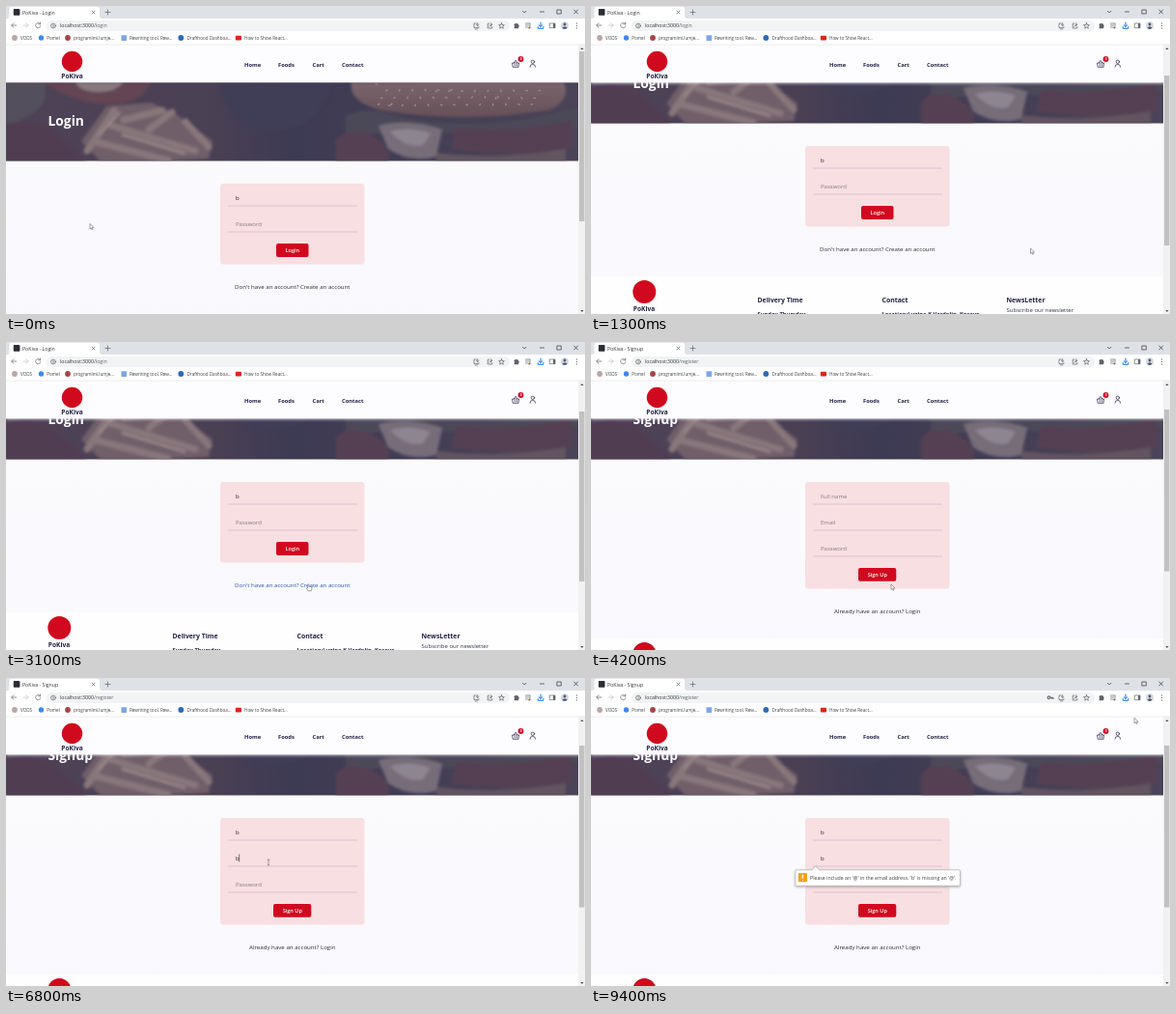
Recreate the animation shown at these times as an HTML page. Size 600 px wide and 319 px high, loop 9500 ms.

```html
<!DOCTYPE html>
<html lang="en">
<head>
<meta charset="utf-8">
<title>Signup walkthrough</title>
<style>
  html, body { margin: 0; width: 100%; height: 100%; overflow: hidden; background: #fff; }
  svg { display: block; width: 100vw; height: 100vh; }
  text { font-family: "Open Sans", "Noto Sans", sans-serif; white-space: pre; }
  .ui { font-size: 5.2px; fill: #303236; }
  .mark { font-size: 4.6px; fill: #3c4043; }
  .nav { font-size: 5.8px; font-weight: 700; fill: #212245; }
  .brand { font-size: 6.6px; font-weight: 700; fill: #212245; }
  .title { font-size: 13.8px; font-weight: 700; fill: #fff; }
  .hint { font-size: 6px; fill: #85797f; }
  .value { font-size: 6px; fill: #222; }
  .link { font-size: 6.13px; fill: #2b2d38; text-anchor: middle; }
  .link.hover { fill: #2456ae; }
  .button { font-size: 5.55px; font-weight: 600; fill: #fff; text-anchor: middle; }
  .head { font-size: 6.9px; font-weight: 700; fill: #212245; }
  .small { font-size: 6px; fill: #33364a; }
  .rule { fill: none; stroke: #cdb9ce; stroke-width: .7; }
  .icon { fill: none; stroke: #5f6368; stroke-width: .7; stroke-linecap: round; stroke-linejoin: round; }
  .off { display: none; }
</style>
</head>
<body>
<svg viewBox="0 0 600 319" preserveAspectRatio="none">
  <defs>
    <clipPath id="view"><rect y="40" width="593" height="279"/></clipPath>
    <clipPath id="heroBox"><rect y="79" width="593" height="81.5"/></clipPath>
    <filter id="soft" x="-10%" y="-10%" width="120%" height="120%"><feGaussianBlur stdDeviation="1.6"/></filter>
    <filter id="shade" x="-10%" y="-30%" width="120%" height="180%"><feDropShadow dx="0" dy="1" stdDeviation="1.3" flood-color="#333" flood-opacity=".4"/></filter>
    <filter id="glow" x="-2%" y="-10%" width="104%" height="130%"><feDropShadow dx="0" dy="1" stdDeviation="1.4" flood-color="#e4e2ea" flood-opacity=".8"/></filter>
    <linearGradient id="dusk">
      <stop offset="0" stop-color="#4e4257"/><stop offset=".36" stop-color="#4a4054"/>
      <stop offset=".5" stop-color="#3d3a53"/><stop offset="1" stop-color="#4b4357"/>
    </linearGradient>
    <linearGradient id="bun" x2="0" y2="1">
      <stop offset="0" stop-color="#7a656c"/><stop offset="1" stop-color="#665058"/>
    </linearGradient>
    <linearGradient id="paper" x2="0" y2="1">
      <stop offset="0" stop-color="#fcfbfd"/><stop offset="1" stop-color="#f9f8fc"/>
    </linearGradient>
  </defs>

  <rect width="600" height="319" fill="url(#paper)"/>

  <g clip-path="url(#view)">
    <g id="page">
      <g clip-path="url(#heroBox)">
        <rect y="79" width="594" height="82" fill="url(#dusk)"/>
        <g filter="url(#soft)">
          <path d="M0 79H40Q46 100 26 112T0 122Z" fill="#524f5c"/>
          <path d="M38 79H150Q140 101 108 102T38 79Z" fill="#634552"/>
          <path d="M72 79H122Q112 90 94 89T72 79Z" fill="#88797f"/>
          <path d="M0 122Q36 114 58 136T84 161H0Z" fill="#513c51"/>
          <path d="M78 140L104 104 150 100 176 112 214 140 210 158 150 161H98Z" fill="#6f5f69"/>
          <g stroke="#88767a" stroke-width="7" stroke-linecap="round">
            <path d="M84 150L112 108M110 124L196 150M122 118L162 108M148 128L172 110M186 120L210 146M90 140L168 160"/>
          </g>
          <path d="M96 134L118 110M120 133L186 153" stroke="#9b888a" stroke-width="2.5"/>
          <path d="M222 79H338Q326 126 278 130T222 79Z" fill="#413d57"/>
          <path d="M358 79H578Q586 98 562 108Q470 122 388 108Q354 98 358 79Z" fill="url(#bun)"/>
          <path d="M352 114Q372 104 398 112T470 122T594 106V126Q530 136 470 132T352 136Z" fill="#4b4a58"/>
          <path d="M386 124Q416 116 452 128L446 156Q418 163 396 148Z" fill="#766d79"/>
          <path d="M398 130Q418 124 440 132L432 144Q414 148 398 130Z" fill="#8d858f"/>
          <path d="M466 126Q530 132 586 118V148Q530 158 462 148Z" fill="#544152"/>
          <path d="M342 138Q356 124 378 134T396 161H342Z" fill="#543f53"/>
          <path d="M446 152Q510 160 580 148V161H446Z" fill="#625560"/>
        </g>
        <g id="seeds" fill="#9a878a"></g>
      </g>
      <text id="title" class="title" x="43.5" y="124">Login</text>

      <g id="login">
        <rect x="222" y="184" width="149.5" height="83.5" rx="3" fill="#f8dfe1"/>
        <path class="rule" d="M230 207H364M230 234H364"/>
        <text class="value" x="238" y="201">b</text>
        <text class="hint" x="238" y="228">Password</text>
        <rect x="280" y="246" width="33.5" height="14" rx="2" fill="#d1091f"/>
        <text class="button" x="296.8" y="255">Login</text>
        <text class="link" x="296.8" y="293">Don't have an account? Create an account</text>
      </g>

      <g id="signup">
        <rect x="222" y="184" width="149.5" height="110.5" rx="3" fill="#f8dfe1"/>
        <path class="rule" d="M230 207H364M230 234H364M230 261H364"/>
        <text id="name" x="238" y="201"></text>
        <text id="email" x="238" y="228"></text>
        <text id="pass" x="238" y="255"></text>
        <path id="caret" d="M241.7 0V8" stroke="#222" stroke-width=".6"/>
        <rect x="277" y="273" width="39.3" height="13.7" rx="2" fill="#d1091f"/>
        <text class="button" x="296.8" y="281.7">Sign Up</text>
        <text class="link" x="296.8" y="319.6">Already have an account? Login</text>
      </g>

      <g id="footer">
        <rect y="319" width="594" height="60" fill="#fefefe"/>
        <circle cx="55.3" cy="335" r="12" fill="#d1091f"/>
        <text class="brand" x="55" y="355" text-anchor="middle">PoKiva</text>
        <text class="head" x="172.5" y="345.6">Delivery Time</text>
        <text class="head" x="301.5" y="345.6">Contact</text>
        <text class="head" x="430.5" y="345.6">NewsLetter</text>
        <text class="nav" x="172.5" y="359.5">Sunday-Thursday</text>
        <text class="nav" x="301.5" y="359.5">Location:Lugina K Vardolin, Kosovo</text>
        <text class="small" x="430.5" y="356.3">Subscribe our newsletter</text>
      </g>
    </g>

    <rect id="header" y="36" width="594" height="43.3" fill="#fdfcfe"/>
    <circle cx="68.5" cy="57.5" r="10.7" fill="#d1091f"/>
    <text class="brand" x="68.5" y="75.2" text-anchor="middle">PoKiva</text>
    <text class="nav" x="247" y="63">Home</text>
    <text class="nav" x="282" y="63">Foods</text>
    <text class="nav" x="317.5" y="63">Cart</text>
    <text class="nav" x="348" y="63">Contact</text>
    <g class="icon" style="stroke:#212245">
      <path d="M525 59H531.6L531 63.3H525.6ZM526.3 59L528 56.3 530 59M527.3 60.5V62M529.4 60.5V62"/>
      <circle cx="545.8" cy="57.8" r="1.7"/><path d="M543 63.2Q543 60.3 545.8 60.3T548.6 63.2"/>
    </g>
    <circle cx="533.5" cy="55" r="2.9" fill="#d1091f"/>
    <text x="533.5" y="56.4" font-size="3.8" font-weight="700" fill="#fff" text-anchor="middle">3</text>
  </g>

  <!-- scrollbar -->
  <rect x="593" y="40" width="7" height="279" fill="#f1f1f1"/>
  <rect id="thumb" x="594" width="5.4" fill="#c1c1c1"/>
  <path d="M595.2 45L596.9 43 598.6 45ZM595.2 315L596.9 317 598.6 315Z" fill="#555"/>

  <!-- browser frame -->
  <rect width="600" height="13" fill="#dee1e6"/>
  <rect y="13" width="600" height="27" fill="#fff"/>
  <path d="M0 40H600" stroke="#e0e2e5" stroke-width=".6"/>
  <path d="M1 13Q3.5 13 3.5 10V3Q3.5 .8 6 .8H94.5Q97 .8 97 3V10Q97 13 99.5 13Z" fill="#fff"/>
  <rect x="7.8" y="3" width="6.6" height="6.8" rx=".8" fill="#282c34"/>
  <text id="tab" class="ui" x="17" y="8.5"></text>
  <path class="icon" d="M89 5L92 8M92 5L89 8M105.5 4V9M103 6.5H108"/>
  <path class="icon" style="stroke:#333" d="M535.5 5.3L537.2 7 538.9 5.3M553.5 6H557.5M571.3 4H575.3V8H571.3ZM588.7 4L592.5 8M592.5 4L588.7 8"/>

  <path class="icon" d="M10.8 20H5.8M8 17.7L5.7 20 8 22.3M35.4 18.6A2.6 2.6 0 1 0 35.8 20.7M35.7 16.9V18.8H33.7"/>
  <path class="icon" style="stroke:#bdc1c6" d="M18 20H23M20.8 17.7L23.1 20 20.8 22.3"/>
  <rect x="42" y="15" width="480" height="11" rx="5.5" fill="#f1f3f4"/>
  <g class="icon">
    <circle cx="49" cy="20.5" r="2.4"/><path d="M49 20.3V21.7M49 19.2V19.3"/>
    <path d="M490 21.7V22.5H485V18H487.4M488.7 17.5V20.5M487.4 19.3L488.7 20.5 490 19.3M486.3 24H488.8"/>
    <path d="M501 18.2H499.2V23H503.8V21.5M500.7 21.2Q501 19.2 503.5 19.2M502.3 17.6L504 19.2 502.3 20.8"/>
    <path d="M513.5 17.5L514.3 19.5 516.4 19.7 514.8 21.1 515.3 23.2 513.5 22.1 511.7 23.2 512.2 21.1 510.6 19.7 512.7 19.5Z"/>
    <path d="M538.5 18H543M538.5 20H541.5M538.5 22H540.5M543 18.4V22.3"/>
    <path d="M563.7 18H569V22.7H563.7Z"/>
  </g>
  <path d="M526.5 18.5H528Q528.7 16.3 529.6 18.5H531.2V20Q533 20.8 531.2 21.5V23.2H526.5V21.7Q528 20.8 526.5 20Z" fill="#5f6368"/>
  <path d="M567 18H569V22.7H567Z" fill="#5f6368"/>
  <circle cx="542.3" cy="22.5" r="1" fill="#5f6368"/>
  <path class="icon" style="stroke:#1a73e8;stroke-width:1" d="M554 17V21.2M552.2 19.7L554 21.4 555.8 19.7M551.2 21.5V23.3H556.8V21.5"/>
  <circle cx="579" cy="20.3" r="4" fill="#d5dae2"/>
  <path d="M576.3 22.8Q579 19.5 581.7 22.8Q579 25 576.3 22.8Z" fill="#4b5668"/><circle cx="579" cy="19" r="1.4" fill="#4b5668"/>
  <path d="M591.5 17.8V18M591.5 20.3V20.5M591.5 22.8V23" class="icon" style="stroke-width:1.1"/>
  <g id="key" class="icon"><circle cx="474.5" cy="20.3" r="1.4" stroke-width="1.1"/><path d="M476 20.3H479V21.6M477.7 20.3V21.4" stroke-width="1"/></g>
  <text class="ui" x="56" y="22.3">localhost:3000<tspan id="path" fill="#5f6368"></tspan></text>

  <circle cx="9" cy="33" r="2.9" fill="#b9a6a4"/><text class="mark" x="15" y="34.8">VODS</text>
  <circle cx="36.5" cy="33" r="2.7" fill="#4285f4"/><text class="mark" x="42.3" y="34.8">Pomel</text>
  <circle cx="64" cy="33" r="2.9" fill="#a6454a"/><text class="mark" x="70" y="34.8">programimi.lumje...</text>
  <rect x="119.5" y="30.2" width="5.6" height="5.8" rx=".6" fill="#7fa5e6"/><text class="mark" x="128" y="34.8">Rewriting tool, Rew...</text>
  <circle cx="181.3" cy="33" r="2.9" fill="#2b6cb5"/><text class="mark" x="187.5" y="34.8">Drafthood Dashboa...</text>
  <rect x="237.8" y="30.7" width="6.2" height="4.8" rx="1" fill="#e3211c"/><text class="mark" x="247" y="34.8">How to Show React...</text>

  <g id="bubble">
    <path filter="url(#shade)" d="M213 198.8H229L232.8 195.2 236.6 198.8H381.3Q382.5 198.8 382.5 200V214Q382.5 215.2 381.3 215.2H213Q211.8 215.2 211.8 214V200Q211.8 198.8 213 198.8Z" fill="#fff" stroke="#a5a5a8" stroke-width=".6"/>
    <rect x="214.8" y="202" width="9.2" height="9.2" rx="1" fill="#f5a21d"/>
    <path d="M219.4 203.8V207.5M219.4 209V209.7" stroke="#fff" stroke-width="1.2"/>
    <text x="227" y="208.9" font-size="5.23" fill="#3f4045">Please include an '@' in the email address. 'b' is missing an '@'.</text>
  </g>

  <g id="cursor" stroke="#4a4a4a" stroke-width=".5" stroke-linejoin="round">
    <path id="arrow" fill="#fff" d="M0 0V5.4L1.3 4.3 2.2 6.3 3.1 5.9 2.2 4H4Z"/>
    <path id="hand" fill="#fff" d="M-.6 4V.6Q0 -.2 .6 .6V2.8L3.4 3.4Q3.8 6 2.6 7.4H-.4L-2 4.6Q-1.8 3.6 -.6 4Z"/>
    <path id="beam" fill="none" d="M-1.2 -2.8H1.2M0 -2.8V2.8M-1.2 2.8H1.2"/>
  </g>
</svg>
<script>
  const LOOP = 9500, STEP = 100, SCROLL = 39;
  const NAVIGATE = 3600, SUBMIT = 7600;
  const $ = id => document.getElementById(id);
  const show = (id, on) => $(id).classList.toggle('off', !on);
  const ease = p => p * p * (3 - 2 * p);

  // time, x, y of the pointer's hot spot
  const route = [
    [0, 87, 225.5], [900, 440, 258], [1300, 455.5, 251], [2000, 455.5, 251],
    [2800, 313.5, 250.5], [3700, 313.5, 250.5], [4200, 311, 251], [4900, 311, 251],
    [5700, 273, 184.5], [6000, 272, 161], [6300, 272, 161], [6500, 272, 187],
    [6750, 272, 187], [6950, 272, 212], [7150, 272, 212], [7400, 292, 240],
    [7550, 292, 240], [7700, 287.5, 229.5], [8400, 287.5, 229.5], [9400, 563, 41.3]
  ];
  const fields = [
    { id: 'name', hint: 'Full name', value: 'b', focus: 6000, typed: 6300, line: 207 },
    { id: 'email', hint: 'Email', value: 'b', focus: 6500, typed: 6700, line: 234 },
    { id: 'pass', hint: 'Password', value: '•', focus: 6950, typed: 7100, line: 261 }
  ];

  // sesame seeds scattered evenly over the bun
  function sowSeeds() {
    let seeds = '';
    for (let i = 0; i < 44; i++) {
      const x = 384 + i * 61.8 % 172, y = 81 + i * 7.3 % 22;
      seeds += `<ellipse cx="${x}" cy="${y}" rx="1.5" ry=".8" transform="rotate(${i * 50} ${x} ${y})"/>`;
    }
    $('seeds').innerHTML = seeds;
  }

  function pointerAt(t) {
    const i = route.findIndex(stop => stop[0] > t);
    if (i < 0) return route[route.length - 1].slice(1);
    const [t0, x0, y0] = route[i - 1], [t1, x1, y1] = route[i];
    const p = ease((t - t0) / (t1 - t0));
    return [x0 + (x1 - x0) * p, y0 + (y1 - y0) * p];
  }

  function drawFields(t) {
    for (const f of fields) {
      const filled = t >= f.typed, el = $(f.id);
      el.textContent = filled ? f.value : f.hint;
      el.setAttribute('class', filled ? 'value' : 'hint');
    }
    const focused = t >= SUBMIT ? fields[1] : fields.filter(f => t >= f.focus).pop();
    const since = focused ? t - (t >= SUBMIT ? SUBMIT : focused.focus) : 0;
    show('caret', focused && since % 1000 < 500);
    if (focused) {
      const dx = t >= focused.typed ? 0 : -3.7;
      $('caret').setAttribute('transform', `translate(${dx} ${focused.line - 12.5})`);
    }
  }

  function drawPointer(t, signup, scroll) {
    const [x, y] = pointerAt(t), py = y + scroll;
    const inside = (x0, x1, y0, y1) => x > x0 && x < x1 && py > y0 && py < y1;
    const onLink = signup ? inside(252, 342, 314, 322) : inside(237, 357, 287, 296);
    const onButton = signup ? inside(277, 316, 273, 287) : inside(280, 313, 246, 260);
    const lines = signup ? [207, 234, 261] : [207, 234];
    const onField = lines.some(line => inside(230, 364, line - 17, line));
    const covered = t > SUBMIT && inside(212, 382, 238, 254);
    const shape = onLink || onButton ? 'hand' : onField && !covered ? 'beam' : 'arrow';
    for (const id of ['arrow', 'hand', 'beam']) show(id, id === shape);
    $('cursor').setAttribute('transform', `translate(${x} ${y})`);
    document.querySelectorAll('.link').forEach(link => link.classList.toggle('hover', onLink));
  }

  function draw(t) {
    const signup = t >= NAVIGATE;
    const p = ease(Math.min(1, Math.max(0, (t - 1000) / 300)));
    const scroll = SCROLL * p;
    const label = signup ? 'Signup' : 'Login';

    $('page').setAttribute('transform', `translate(0 ${-scroll})`);
    $('footer').setAttribute('transform', `translate(0 ${signup ? 27 : 0})`);
    $('header').setAttribute('filter', scroll > 0 ? 'url(#glow)' : 'none');
    $('thumb').setAttribute('y', signup ? 70 : 47 + 25 * p);
    $('thumb').setAttribute('height', signup ? 167.5 : 176);
    $('title').textContent = label;
    $('tab').textContent = 'PoKiva - ' + label;
    $('path').textContent = signup ? '/register' : '/login';
    show('login', !signup);
    show('signup', signup);
    show('key', t >= fields[2].typed);
    drawFields(t);

    const arriving = t < SUBMIT + 200;
    show('bubble', t > SUBMIT);
    $('bubble').setAttribute('opacity', arriving ? .85 : 1);
    $('bubble').setAttribute('transform', `translate(212 199) scale(${arriving ? .982 : 1}) translate(-212 -199)`);
    drawPointer(t, signup, scroll);
  }

  sowSeeds();
  const start = performance.now();
  function tick() {
    const t = (performance.now() - start) % LOOP;
    draw(Math.floor(t / STEP) * STEP);
    requestAnimationFrame(tick);
  }
  tick();
</script>
</body>
</html>
```
